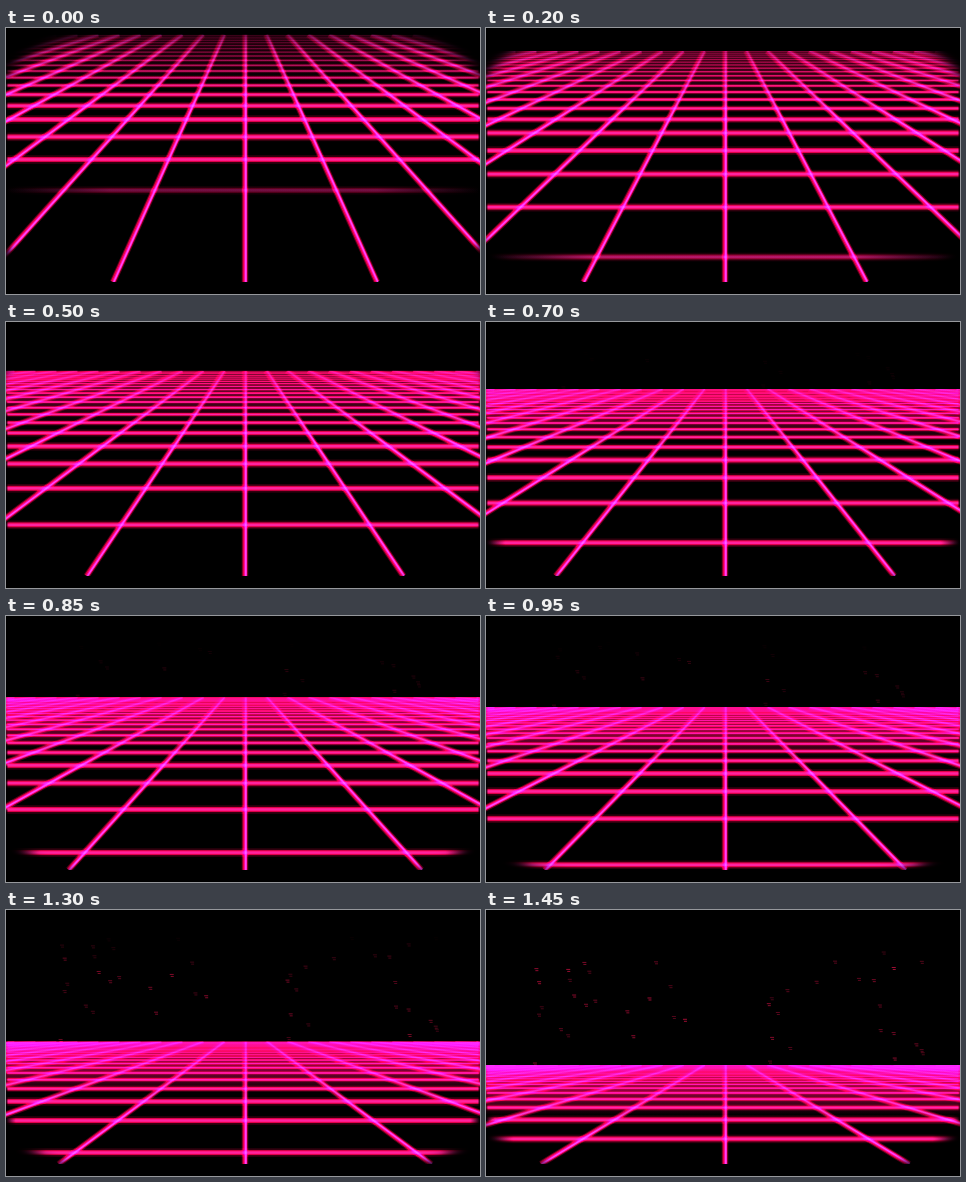
Animation of 474 by 266 pixels, one loop 1.5 s. Source, as an HTML page with a canvas:

```html
<!DOCTYPE html>
<html>
<head>
<meta charset="utf-8">
<style>
  html, body { margin: 0; width: 100%; height: 100%; overflow: hidden; background: #000; }
  canvas { display: block; }
</style>
</head>
<body>
<canvas id="stage" width="474" height="266"></canvas>
<script>
const ctx = document.getElementById('stage').getContext('2d');
const W = 474, H = 266, CX = 239, FRONT = 254, LOOP = 1500, STEP = 50;
const FAR_SPACING = 21, ROW_RATIO = .00197;

const clamp = (v, lo = 0, hi = 1) => Math.max(lo, Math.min(hi, v));

function seeded(seed) {
  return () => (seed = seed * 16807 % 2147483647) / 2147483647;
}

const random = seeded(41);
const stars = Array.from({ length: 42 }, (_, i) => ({
  x: (i % 2 ? 1 : -1) * (40 + 160 * random()),
  y: 115 * random(),
  light: .4 + .6 * random()
}));

// The camera sinks towards the floor while flying forward; s is in seconds.
function cameraAt(s) {
  const spread = 132 + s * (42 + 35 * s - 27 * s * s);
  const vanish = -40 + 115 * s + .8 * s ** 8;
  const slope = spread / (FRONT - 1 - vanish);
  return {
    spread, vanish, slope,
    horizon: vanish + FAR_SPACING / slope,
    travel: 5.57 - s * (3.32 - .8 * s + .3 * s * s),
    reach: 185 + 400 * s,
    fog: clamp(.15 + s),
    zoom: .71 + .2 * s,
    starlight: clamp((s - .55) * .9)
  };
}

function drawStars({ horizon, zoom, starlight }) {
  ctx.fillStyle = '#c3103f';
  for (const { x, y, light } of stars) {
    const sx = CX + x * zoom, sy = horizon - y;
    ctx.globalAlpha = starlight * light * clamp((sy - 25) / 30);
    ctx.fillRect(sx - 2, sy - 1, 4, 1);
    ctx.fillRect(sx - 1, sy + 1, 3, 1);
  }
}

function drawFog({ horizon, fog }) {
  const g = ctx.createLinearGradient(0, horizon, 0, horizon + 50);
  g.addColorStop(0, 'rgba(190,5,75,1)');
  g.addColorStop(.5, 'rgba(190,5,75,.75)');
  g.addColorStop(1, 'rgba(190,5,75,0)');
  ctx.globalAlpha = fog;
  ctx.fillStyle = g;
  ctx.fillRect(0, horizon, W, 50);
}

// A bar whose ends fade out over the `inset` share of the width.
function bar(y, size, rgb, inset) {
  const g = ctx.createLinearGradient(0, 0, W, 0);
  g.addColorStop(0, `rgba(${rgb},0)`);
  g.addColorStop(inset, `rgb(${rgb})`);
  g.addColorStop(1 - inset, `rgb(${rgb})`);
  g.addColorStop(1, `rgba(${rgb},0)`);
  ctx.fillStyle = g;
  ctx.fillRect(0, y - size / 2, W, size);
}

function drawRows({ vanish, slope, horizon, travel, reach, fog }) {
  const density = ROW_RATIO * slope;
  for (let q = travel % 1 + 1; ; q++) {
    const depth = 1 / (density * q), y = vanish + depth;
    if (y < horizon) break;
    const near = clamp((reach - y) / 55);
    const size = clamp(depth * depth * density * .36, .6, 5);
    const inset = clamp((1 - near) * .5 + (y - 200) / 500, .005, .45);
    ctx.globalAlpha = near * clamp((y - horizon) / 70 + fog, .3);
    bar(y, size * 1.7, '50,0,14', inset);
    bar(y, size, '175,0,60', inset);
    bar(y, size * .5, '50,35,85', inset);
  }
}

function drawColumns({ spread, horizon }) {
  const layers = [
    ['90,0,25', 6.5, 0], ['140,0,45', 4.5, 0], ['60,15,100', 2.8, .6], ['10,60,90', 1.3, .8]
  ];
  ctx.globalAlpha = 1;
  for (const [rgb, width, shift] of layers) {
    const fade = ctx.createLinearGradient(0, horizon, 0, horizon + 70);
    fade.addColorStop(0, `rgba(${rgb},.3)`);
    fade.addColorStop(1, `rgb(${rgb})`);
    ctx.strokeStyle = fade;
    ctx.lineWidth = width;
    for (let n = -12; n <= 12; n++) {
      ctx.beginPath();
      ctx.moveTo(CX + n * FAR_SPACING + shift, horizon);
      ctx.lineTo(CX + n * spread + shift, FRONT);
      ctx.stroke();
    }
  }
}

// Soft black surround with the rounded corners of a tube screen.
function drawVignette() {
  ctx.filter = 'blur(5px)';
  ctx.fillStyle = '#000';
  ctx.beginPath();
  ctx.rect(-60, -60, W + 120, H + 120);
  ctx.roundRect(-9, 4, W + 18, 259, { x: 130, y: 70 });
  ctx.fill('evenodd');
  ctx.filter = 'none';
}

function frame() {
  const t = Math.floor(performance.now() % LOOP / STEP) * STEP;
  const cam = cameraAt(t / 1000);
  ctx.globalAlpha = 1;
  ctx.fillStyle = '#000';
  ctx.fillRect(0, 0, W, H);
  drawStars(cam);
  ctx.save();
  ctx.beginPath();
  ctx.rect(0, cam.horizon, W, FRONT - cam.horizon);
  ctx.clip();
  ctx.globalCompositeOperation = 'lighter';
  drawFog(cam);
  drawRows(cam);
  drawColumns(cam);
  ctx.restore();
  ctx.globalAlpha = 1;
  drawVignette();
  requestAnimationFrame(frame);
}
frame();
</script>
</body>
</html>
```
